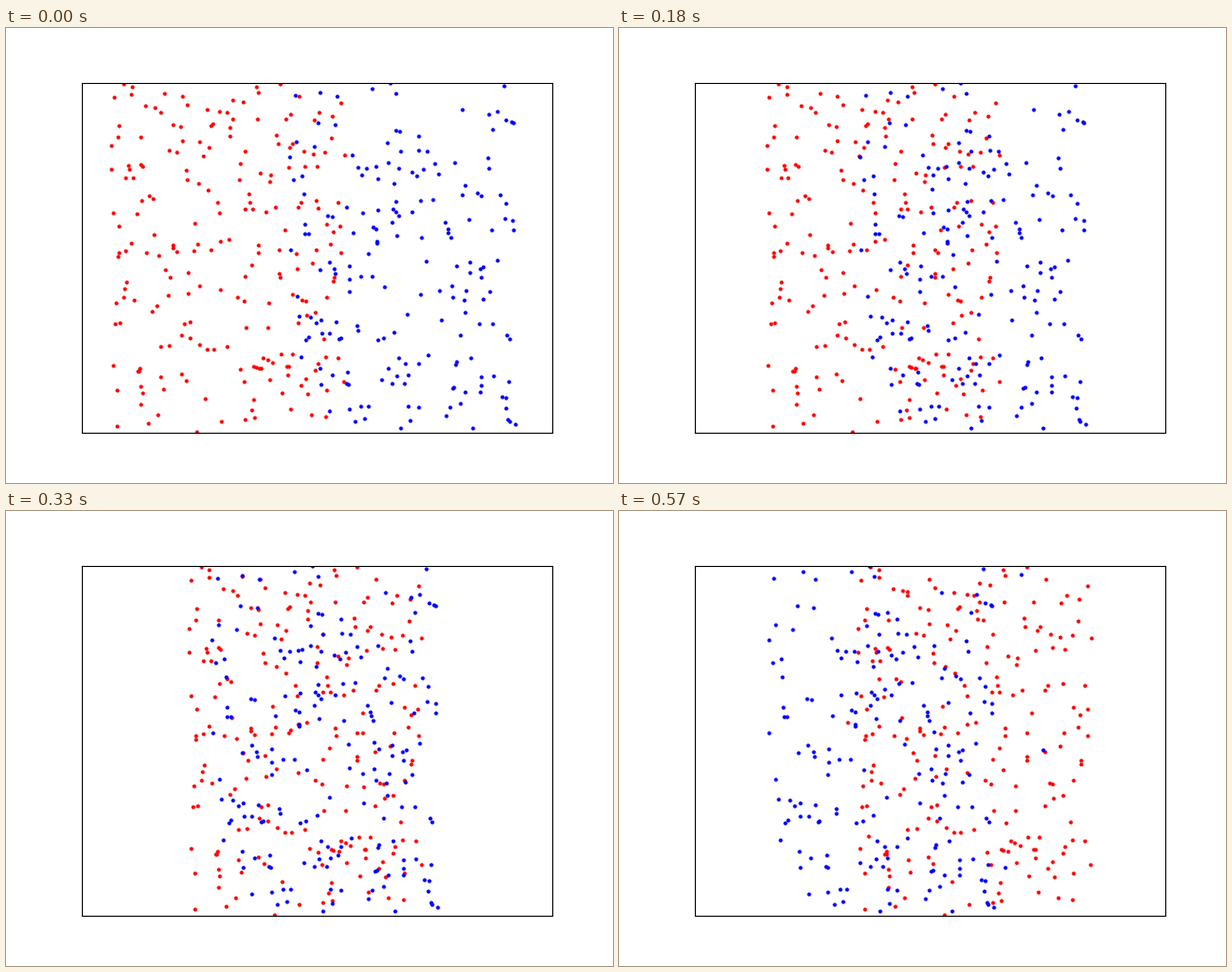
Recreate the animation shown at these times as a matplotlib script. Size 640x480 px, loop 600 ms.

```python
import numpy as np
import matplotlib.pyplot as plt
from matplotlib.animation import FuncAnimation

FRAMES, INTERVAL = 20, 30
WARMUP = 4            # steps run before the first picture
N_RED, N_BLUE = 215, 185
STEP = 0.015          # box widths per picture
CONTACT = 0.003       # collision distance

rng = np.random.default_rng(7)
n = N_RED + N_BLUE
red = np.arange(n) < N_RED
pos = rng.random((n, 2))
pos[:, 0] = pos[:, 0] / 2 + np.where(red, 0, 0.5)
vel = np.zeros((n, 2))
vel[:, 0] = np.where(red, STEP, -STEP)
first, second = np.triu_indices(n, 1)


def collide(pos, vel):
    """Elastic collisions between equal masses that approach each other."""
    gap = pos[first] - pos[second]
    for k in np.flatnonzero((gap ** 2).sum(axis=1) < CONTACT ** 2):
        a, b = first[k], second[k]
        normal = gap[k] / np.hypot(*gap[k])
        speed = (vel[a] - vel[b]) @ normal
        if speed < 0:
            vel[a] -= speed * normal
            vel[b] += speed * normal


def bounce(pos, vel):
    vel[pos < 0] = np.abs(vel[pos < 0])
    vel[pos > 1] = -np.abs(vel[pos > 1])


def simulate(pos, vel, steps):
    path = [pos.copy()]
    for _ in range(steps):
        collide(pos, vel)
        bounce(pos, vel)
        pos = pos + vel
        path.append(pos)
    return path


path = simulate(pos, vel, WARMUP + FRAMES - 1)[WARMUP:]

fig, ax = plt.subplots(figsize=(6.4, 4.8), dpi=100)
fig.subplots_adjust(left=0.125, right=0.9, bottom=0.11, top=0.88)
ax.set(xlim=(0, 1), ylim=(0, 1), xticks=[], yticks=[])
red_dots, = ax.plot([], [], "o", color="red", ms=2)
blue_dots, = ax.plot([], [], "o", color="blue", ms=2)


def draw(i):
    red_dots.set_data(*path[i][red].T)
    blue_dots.set_data(*path[i][~red].T)
    return red_dots, blue_dots


anim = FuncAnimation(fig, draw, frames=FRAMES, interval=INTERVAL,
                     repeat=True, repeat_delay=0)
plt.show()
```
